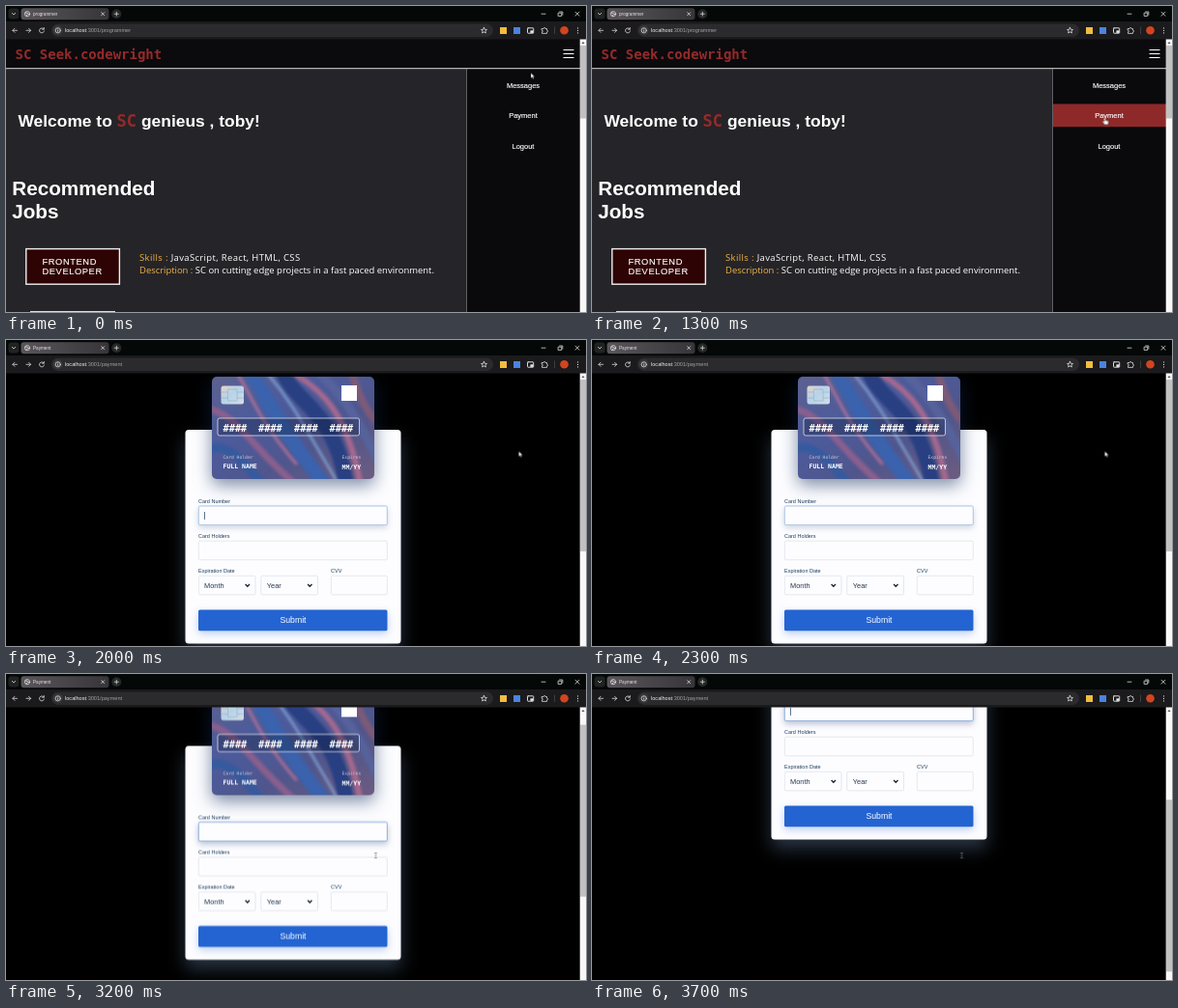
Animation of 600 by 317 pixels, one loop 3800 ms. Source, as an HTML page:

```html
<!DOCTYPE html>
<html lang="en">
<head>
<meta charset="utf-8">
<title>Job board to payment</title>
<style>
  html, body { margin: 0; width: 100%; height: 100%; overflow: hidden; background: #000; }
  svg { display: block; width: 100%; height: 100%; }
  text { font-family: "Liberation Sans", Arial, sans-serif; white-space: pre; }
  .mono { font-family: "DejaVu Sans Mono", "Liberation Mono", monospace; }
  .soft { font-family: "Open Sans", sans-serif; font-size: 9.45px; font-weight: 500; fill: #fff; }
  .soft .key { fill: #f0b445; }
  .bold { font-weight: 700; fill: #fff; }
  .brand { fill: #962a2a; }
  .menu text { font-size: 7.5px; fill: #fff; stroke: #fff; stroke-width: .15; text-anchor: middle; }
  .job { font-size: 9.3px; letter-spacing: .6px; fill: #fff; stroke: #fff; stroke-width: .15; }
  .label { font-size: 5.5px; fill: #1a3b5d; }
  .pick { font-size: 7.4px; fill: #24374f; }
  .field { fill: #fdfdff; stroke: #d3d9e4; stroke-width: .6; }
  .line { fill: none; stroke: #dcdcdc; stroke-width: .8; stroke-linecap: round; }
  .chev { fill: none; stroke: #17202e; stroke-width: 1.3; }
  .tab { font-size: 4.65px; fill: #e4e4e4; }
  .url { font-size: 5.6px; fill: #f0f0f0; }
  .url tspan { fill: #a2a2a2; }
  .small { font-size: 4.7px; fill: #c9c9d8; }
  .name { font-size: 6.5px; fill: #fff; font-weight: 700; }
  .grip { fill: #c1c1c1; }

  [class^="t-"] { animation: 3.8s step-end infinite; }
  .t-home { animation-name: home; }
  .t-pay { animation-name: pay; }
  .t-raw { animation-name: raw; }
  .t-ready { animation-name: ready; }
  .t-over1 { animation-name: over1; }
  .t-over2 { animation-name: over2; }
  .t-hand { animation-name: hand; }
  .t-arrow { animation-name: arrow; }
  .t-beam { animation-name: beam; }
  .t-caret { animation-name: caret; }
  .t-glow { animation-name: glow; }
  .t-move { animation-name: move; }
  .t-scroll { animation-name: scroll; }
  .t-thumb { animation-name: thumb; }

  @keyframes home { 0% { opacity: 1 } 36.84%, 100% { opacity: 0 } }
  @keyframes pay { 0% { opacity: 0 } 36.84%, 100% { opacity: 1 } }
  @keyframes raw { 0% { opacity: 0 } 36.84% { opacity: 1 } 50%, 100% { opacity: 0 } }
  @keyframes ready { 0% { opacity: 0 } 50%, 100% { opacity: 1 } }
  @keyframes over1 { 0% { opacity: 0 } 2.63% { opacity: 1 } 10.52%, 100% { opacity: 0 } }
  @keyframes over2 { 0% { opacity: 0 } 13.15%, 100% { opacity: 1 } }
  @keyframes hand { 0% { opacity: 0 } 2.63% { opacity: 1 } 36.84%, 100% { opacity: 0 } }
  @keyframes arrow { 0% { opacity: 1 } 2.63% { opacity: 0 } 36.84% { opacity: 1 } 73.68%, 100% { opacity: 0 } }
  @keyframes beam { 0% { opacity: 0 } 73.68%, 100% { opacity: 1 } }
  @keyframes caret {
    0% { opacity: 0 } 50% { opacity: 1 } 57.89% { opacity: 0 }
    71.05% { opacity: 1 } 84.2% { opacity: 0 } 97.36%, 100% { opacity: 1 }
  }
  @keyframes glow { 0% { opacity: .65 } 73.68%, 100% { opacity: 1 } }
  @keyframes move {
    0% { transform: translate(543px, 69.5px); animation-timing-function: steps(6) }
    15.78% { transform: translate(530.5px, 115.5px) }
    63.15% { transform: translate(530.5px, 115.5px); animation-timing-function: steps(4) }
    73.68%, 100% { transform: translate(382.5px, 188px) }
  }
  @keyframes scroll {
    0% { transform: translateY(0) }
    76.31% { transform: translateY(-1.2px) }
    78.94% { transform: translateY(-4px) }
    81.57% { transform: translateY(-10px) }
    84.2% { transform: translateY(-18.5px) }
    86.84% { transform: translateY(-46px) }
    89.47% { transform: translateY(-88px) }
    92.1% { transform: translateY(-124px) }
    94.73%, 100% { transform: translateY(-143px) }
  }
  @keyframes thumb {
    0% { transform: translateY(0) }
    76.31% { transform: translateY(.8px) }
    78.94% { transform: translateY(2.5px) }
    81.57% { transform: translateY(6.2px) }
    84.2% { transform: translateY(11.6px) }
    86.84% { transform: translateY(28.7px) }
    89.47% { transform: translateY(55px) }
    92.1% { transform: translateY(77.5px) }
    94.73%, 100% { transform: translateY(89.3px) }
  }
</style>
</head>
<body>
<svg viewBox="0 0 600 317" preserveAspectRatio="none">
  <defs>
    <clipPath id="card"><rect x="213" y="38" width="168" height="106" rx="5"/></clipPath>
    <linearGradient id="paint" x2="1" y2="1">
      <stop offset="0" stop-color="#5c618f"/>
      <stop offset=".35" stop-color="#4c5b9c"/>
      <stop offset=".65" stop-color="#50568c"/>
      <stop offset="1" stop-color="#6c5c80"/>
    </linearGradient>
    <linearGradient id="chip" x2="1" y2="1">
      <stop offset="0" stop-color="#e6d3c6"/>
      <stop offset=".45" stop-color="#b7d3e8"/>
      <stop offset="1" stop-color="#d5dde6"/>
    </linearGradient>
    <linearGradient id="tabfill" x2="1">
      <stop offset="0" stop-color="#5a565b"/>
      <stop offset="1" stop-color="#373539"/>
    </linearGradient>
    <path id="chev" class="chev" d="M-2.2 -1.2 0 1.1 2.2 -1.2"/>
    <path id="reload" class="line" d="M39 23.8A2.5 2.5 0 1 0 39.5 26M39.3 22.5v1.7h-1.7"/>
  </defs>

  <rect width="600" height="317"/>

  <!-- Job board -->
  <g class="t-home">
    <rect y="34" width="594" height="283" fill="#252428"/>
    <rect y="34" width="594" height="30.5" fill="#0b0a0d"/>
    <text class="mono brand" x="9.5" y="55" font-size="14" font-weight="700">SC Seek.codewright</text>
    <path d="M576.5 45.5h11M576.5 49.5h11M576.5 53.5h11" stroke="#fff" stroke-width="1.2"/>
    <text class="bold" x="12.5" y="125" font-size="17.4">Welcome to </text>
    <text class="mono brand" x="114.5" y="125" font-size="17" font-weight="700">SC</text>
    <text class="bold" x="140" y="125" font-size="17.4">genieus , toby!</text>
    <text class="bold" font-size="20.7"><tspan x="6.2" y="195.6">Recommended</tspan><tspan x="6.2" y="219.6">Jobs</tspan></text>
    <rect x="20.8" y="251.6" width="96.6" height="36.6" fill="#2e0303" stroke="#eee" stroke-width="1.4"/>
    <text class="job"><tspan x="37.5" y="267.6">FRONTEND</tspan><tspan x="37.5" y="278.4">DEVELOPER</tspan></text>
    <rect x="25" y="316" width="88" height="1" fill="#ddd"/>
    <text class="soft" x="138" y="264.2" letter-spacing=".38"><tspan class="key">Skills : </tspan>JavaScript, React, HTML, CSS</text>
    <text class="soft" x="138" y="277.4"><tspan class="key">Description : </tspan>SC on cutting edge projects in a fast paced environment.</text>

    <g class="menu">
      <rect x="476" y="65" width="118" height="252" fill="#0a090c"/>
      <rect x="476" y="65" width=".8" height="252" fill="#77767a"/>
      <rect class="t-over1" x="477" y="70.3" width="117" height="23.7" fill="#8e2929"/>
      <rect class="t-over2" x="477" y="101.5" width="117" height="23.7" fill="#8e2929"/>
      <text x="535" y="85">Messages</text>
      <text x="535" y="116.4">Payment</text>
      <text x="535" y="147.8">Logout</text>
    </g>
    <rect y="64.2" width="594" height="1" fill="#d8d8d8"/>
  </g>

  <!-- Payment -->
  <g class="t-pay">
    <rect y="34" width="594" height="283"/>
    <g class="t-scroll">
      <rect x="185.5" y="102" width="223" height="222" rx="3" fill="rgba(90,116,148,.45)" style="filter:blur(9px)"/>
      <rect x="185.5" y="93" width="223" height="221.5" rx="3.5" fill="#fdfdff"/>
      <rect x="213" y="44" width="168" height="106" rx="5" fill="rgba(14,42,90,.55)" style="filter:blur(9px)"/>

      <g clip-path="url(#card)">
        <g class="t-raw">
          <rect x="213" y="38" width="168" height="106" fill="#14111d"/>
          <text class="mono small" x="224.5" y="113">Card Holder</text>
          <text class="mono small" x="347.5" y="113">Expires</text>
          <text class="mono name"><tspan x="224.5" y="122">{{N}}</tspan><tspan x="224.5" y="129.5">FULL NAME</tspan></text>
          <text class="mono name"><tspan x="347.5" y="123">{{cardMonth</tspan><tspan x="347.5" y="131.5">/</tspan><tspan x="347.5" y="140">{{String(</tspan></text>
          <text class="mono name"><tspan x="360" y="123">MM</tspan><tspan x="360" y="140">YY</tspan></text>
          <rect x="213.3" y="38.3" width="167.4" height="105.4" rx="5" fill="none" stroke="#3a384a" stroke-width=".7"/>
        </g>
        <g class="t-ready">
          <rect x="213" y="38" width="168" height="106" fill="url(#paint)"/>
          <g fill="none" stroke-linecap="round" style="filter:blur(1.6px)">
            <path d="M205 70C240 76 252 110 300 150" stroke="#8a5f8e" stroke-width="7"/>
            <path d="M214 112C232 108 246 128 262 146" stroke="#365a9e" stroke-width="9"/>
            <path d="M252 32C270 58 280 88 330 150" stroke="#3a62ad" stroke-width="15"/>
            <path d="M270 34C292 60 300 74 342 146" stroke="#7fa0d0" stroke-width="2.5"/>
            <path d="M288 36C300 66 340 72 352 150" stroke="#283f82" stroke-width="16"/>
            <path d="M300 36C326 52 352 74 366 146" stroke="#a5688f" stroke-width="6"/>
            <path d="M240 36C256 62 262 84 300 128" stroke="#ab6f97" stroke-width="3"/>
            <path d="M326 36C350 60 366 84 386 128" stroke="#56629c" stroke-width="9"/>
            <path d="M358 34C366 62 374 76 390 92" stroke="#7c5a78" stroke-width="8"/>
          </g>
          <rect x="222.5" y="47.5" width="23.5" height="19" rx="2.5" fill="url(#chip)"/>
          <path d="M222.5 54h7M222.5 60h7M239 54h7M239 60h7M229.5 51h9.5v12h-9.5z" fill="none" stroke="#8fb0cc" stroke-width=".6"/>
          <rect x="347" y="47" width="16" height="16" fill="#fff"/>
          <rect x="219" y="81" width="146.5" height="18" rx="2" fill="rgba(8,20,47,.3)" stroke="#dfe1ee" stroke-width=".8"/>
          <g class="bold" font-size="10.3">
            <text class="mono" x="224.5" y="95">####</text>
            <text class="mono" x="261" y="95">####</text>
            <text class="mono" x="298" y="95">####</text>
            <text class="mono" x="334.5" y="95">####</text>
          </g>
          <text class="mono small" x="224.5" y="123.3">Card Holder</text>
          <text class="mono small" x="347.5" y="123.3">Expires</text>
          <text class="mono name" x="224.5" y="132.6">FULL NAME</text>
          <text class="mono name" x="347.5" y="133.5">MM/YY</text>
        </g>
      </g>

      <text class="label" x="199" y="168.5">Card Number</text>
      <text class="label" x="199" y="204.8">Card Holders</text>
      <text class="label" x="199" y="241">Expiration Date</text>
      <rect class="field" x="199.3" y="172" width="195" height="19.6" rx="1.5"/>
      <rect class="field" x="199.3" y="208.2" width="195" height="19.6" rx="1.5"/>

      <g class="t-raw">
        <rect class="field" x="199.3" y="244.3" width="60" height="19.6" rx="1.5"/>
        <rect class="field" x="265.5" y="244.3" width="60" height="19.6" rx="1.5"/>
        <rect class="field" x="339.3" y="244.3" width="55" height="19.6" rx="1.5"/>
        <text class="pick" x="205" y="256.8">Month</text>
        <text class="pick" x="271.5" y="256.8">Year</text>
        <text class="label" x="339" y="241">CVV</text>
        <use href="#chev" x="251.3" y="254.2"/>
        <use href="#chev" x="318" y="254.2"/>
      </g>
      <g class="t-ready">
        <rect class="field" x="199.3" y="244.3" width="58.7" height="19.6" rx="1.5"/>
        <rect class="field" x="263.8" y="244.3" width="58.7" height="19.6" rx="1.5"/>
        <rect class="field" x="336.3" y="244.3" width="58" height="19.6" rx="1.5"/>
        <text class="pick" x="205" y="256.8">Month</text>
        <text class="pick" x="269.8" y="256.8">Year</text>
        <text class="label" x="336" y="241">CVV</text>
        <use href="#chev" x="249.8" y="254.2"/>
        <use href="#chev" x="314.3" y="254.2"/>
        <g class="t-glow">
          <rect x="199.3" y="172" width="195" height="19.6" rx="1.5" fill="#fdfdff" stroke="#7fa6d8" stroke-width=".8" style="filter:drop-shadow(0 3px 3px rgba(32,56,117,.3))"/>
        </g>
        <rect class="t-caret" x="205.3" y="178" width=".7" height="8" fill="#1a3b5d"/>
      </g>

      <rect x="199" y="279.5" width="195.5" height="21.7" rx="1.5" fill="#2364d2" style="filter:drop-shadow(0 3px 4px rgba(35,100,210,.3))"/>
      <text x="297" y="293.3" font-size="8.7" fill="#fff" text-anchor="middle">Submit</text>
    </g>
  </g>

  <!-- Scrollbar -->
  <rect x="593.7" y="34" width="6.3" height="283" fill="#f8f8f8"/>
  <path d="M595.4 39 597 37 598.6 39z" fill="#555"/>
  <g class="t-home"><rect class="grip" x="594" y="41" width="6" height="75.5"/></g>
  <g class="t-pay"><g class="t-thumb"><rect class="grip" x="594" y="41" width="6" height="178"/></g></g>

  <!-- Browser -->
  <rect width="600" height="17" fill="#040807"/>
  <rect y="16" width="600" height="18.5" fill="#1b1a1c"/>
  <rect x="2.5" y="2.5" width="11" height="11" rx="3" fill="#202322"/>
  <path class="line" d="M6.3 7.4 8 9 9.7 7.4"/>
  <rect x="15.5" y="2.3" width="91" height="12" rx="3" fill="url(#tabfill)"/>
  <circle class="line" cx="22" cy="8.2" r="2.6"/>
  <path class="line" d="M20 7.2h2l1 1.6 1-.6M21 10.4l1-1.6"/>
  <g class="t-home"><text class="tab" x="28" y="9.9">programmer</text></g>
  <g class="t-raw"><text class="tab" x="28" y="9.9">localhost:3001/payment</text></g>
  <g class="t-ready"><text class="tab" x="28" y="9.9">Payment</text></g>
  <path class="line" d="M98.7 6.7l3 3m0-3l-3 3"/>
  <circle cx="114.3" cy="8.2" r="5" fill="#252827"/>
  <path class="line" d="M112.3 8.2h4M114.3 6.2v4"/>
  <path class="line" d="M554 8.2h4M571.5 7.2h3.2v3.2h-3.2zM572.6 6h3.2v3.2M589 6.2l4 4m0-4l-4 4"/>

  <path class="line" d="M11.5 25.3H7M9 23.2l-2.1 2.1L9 27.4"/>
  <path class="line" d="M21 25.3h4.5M23.5 23.2l2.1 2.1-2.1 2.1"/>
  <g class="t-home"><use href="#reload"/></g>
  <g class="t-raw"><path class="line" d="M35 23.3l4 4m0-4l-4 4"/></g>
  <g class="t-ready"><use href="#reload"/></g>
  <rect x="47" y="18.5" width="457" height="13.5" rx="6.7" fill="#2b2a2d"/>
  <circle cx="53.7" cy="25.3" r="5" fill="#39383b"/>
  <circle class="line" cx="53.7" cy="25.3" r="2.6"/>
  <path class="line" d="M53.7 25.2v1.3M53.7 23.9v.1"/>
  <g class="t-home"><text class="url" x="61" y="27.3">localhost<tspan>:3001/programmer</tspan></text></g>
  <g class="t-pay"><text class="url" x="61" y="27.3">localhost<tspan>:3001/payment</tspan></text></g>
  <path class="line" d="M494.5 22.3l.9 2 2.1.2-1.6 1.4.5 2.1-1.9-1.1-1.9 1.1.5-2.1-1.6-1.4 2.1-.2z"/>
  <rect x="511" y="22" width="7" height="7" fill="#f2bd3c"/>
  <rect x="525" y="22" width="7" height="7" fill="#4a83e0"/>
  <rect class="line" x="539.5" y="22.8" width="6.2" height="5.4" rx=".6" style="stroke-width:1"/>
  <rect x="542.4" y="25.3" width="3" height="2.6" fill="#e6e6ea"/>
  <path class="line" d="M554.5 23.5h1.6a1 1 0 0 1 2 0h1.4v1.6a1 1 0 0 1 0 2v1.3h-5v-1.5a.9.9 0 0 0 0-1.8z"/>
  <rect x="567" y="21.5" width=".6" height="7.5" fill="#555"/>
  <circle cx="577.5" cy="25.3" r="4.3" fill="#d2451e"/>
  <path class="line" d="M591.5 22.8v.1M591.5 25.3v.1M591.5 27.8v.1" style="stroke-width:1.2"/>

  <!-- Pointer -->
  <g class="t-move">
    <path class="t-arrow" d="M0 0v5.2l1.3-1.1.9 2 .8-.4-.8-1.9h1.7z" fill="#fff" stroke="#222" stroke-width=".3"/>
    <path class="t-hand" d="M-.6 .4q.6-.8 1.2 0v2.6l2.5.6q.8.3.7 1.1l-.5 2.6h-3.5l-2.1-2.9q.3-.9 1.2-.3l.5.5z" fill="#fff" stroke="#222" stroke-width=".3"/>
    <path class="t-beam" d="M-1.3-2.7h2.6M-1.3 2.7h2.6M0-2.7v5.4" fill="none" stroke="#76767c" stroke-width=".7"/>
  </g>
</svg>
</body>
</html>
```
